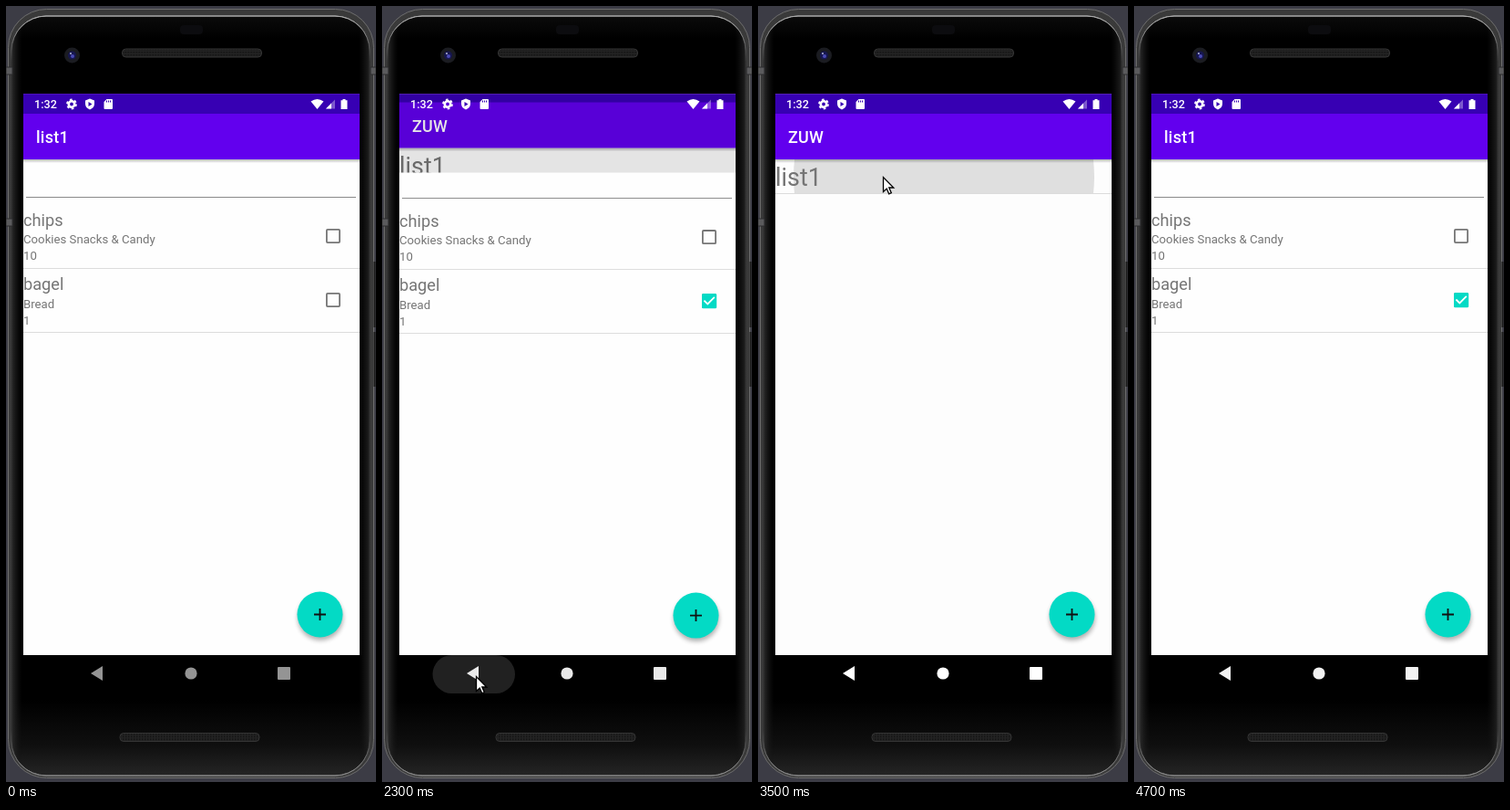
These frames come from a looping animation (406 px wide and 850 px high, 4.8 s). An HTML page:

```html
<!DOCTYPE html>
<html lang="en">
<head>
<meta charset="utf-8">
<title>Shopping list</title>
<style>
html, body { margin: 0; width: 100%; height: 100%; overflow: hidden; background: #3c3c45; }
svg { display: block; width: 406px; height: 850px; }
text { font-family: Roboto, "Open Sans", sans-serif; fill: #757575; white-space: pre; }
.title { font-size: 18px; font-weight: 500; fill: #fff; letter-spacing: .0125em; }
.name { font-size: 18.2px; }
.info { font-size: 13.2px; }
.big { font-size: 26.9px; }
.clock { font-size: 12.6px; font-weight: 500; fill: #fff; }
</style>
</head>
<body>
<svg viewBox="0 0 406 850">
  <defs>
    <linearGradient id="face" x2="0" y2="1">
      <stop offset="0" stop-color="#0b0b0b"/><stop offset=".03"/>
      <stop offset=".9"/><stop offset=".96" stop-color="#0f0f0f"/><stop offset="1" stop-color="#252525"/>
    </linearGradient>
    <linearGradient id="sides">
      <stop offset="0" stop-color="#2c2c2c"/><stop offset=".03" stop-color="#111" stop-opacity="0"/>
      <stop offset=".97" stop-color="#111" stop-opacity="0"/><stop offset="1" stop-color="#222"/>
    </linearGradient>
    <linearGradient id="edge" x2="0" y2="1">
      <stop offset="0" stop-color="#aaa"/><stop offset=".06" stop-color="#333"/>
      <stop offset=".94" stop-color="#333"/><stop offset="1" stop-color="#888"/>
    </linearGradient>
    <linearGradient id="shade" x2="0" y2="1">
      <stop offset="0" stop-opacity=".28"/><stop offset="1" stop-opacity="0"/>
    </linearGradient>
    <pattern id="mesh" width="3" height="3" patternUnits="userSpaceOnUse">
      <rect width="3" height="3" fill="#232323"/><rect width="1.5" height="1.5" fill="#101010"/>
    </pattern>
    <filter id="soft" x="-30%" y="-30%" width="160%" height="160%"><feGaussianBlur stdDeviation="2.5"/></filter>
    <clipPath id="screen"><rect x="19" y="96.5" width="369" height="614.5"/></clipPath>
    <clipPath id="reveal"><rect id="revealBox" x="19" width="369" height="640"/></clipPath>
    <clipPath id="row"><rect x="19" y="168" width="369" height="37"/></clipPath>
    <g id="bar">
      <rect x="19" y="168" width="369" height="4" fill="url(#shade)"/>
      <rect x="19" y="96" width="369" height="72" fill="#6200ee"/>
      <rect x="19" y="96" width="369" height="22" fill="#3700b3"/>
    </g>
    <g id="fab">
      <circle cx="345" cy="670" r="25" opacity=".3" filter="url(#soft)"/>
      <circle cx="344.5" cy="666.5" r="25" fill="#03dac5"/>
      <path d="M338 666.5h13M344.5 660v13" stroke="#111" stroke-width="1.8"/>
    </g>
    <rect id="box" x="351.9" y="244.9" width="14.2" height="14.2" rx="1" fill="none" stroke="#757575" stroke-width="1.8"/>
    <rect id="grille" width="153" height="9" rx="4" fill="url(#mesh)" stroke="#353535"/>
  </defs>

  <!-- phone -->
  <rect x="2.5" y="3.5" width="401" height="842" rx="42" fill="#3a3a3a" stroke="#6e6e6e"/>
  <g stroke="url(#edge)">
    <rect x="6" y="11" width="393" height="832" rx="38" fill="url(#face)"/>
    <rect x="6" y="11" width="393" height="832" rx="38" fill="url(#sides)"/>
  </g>
  <path d="M0 67h7v8H0zM0 233h7v8H0zM400 67h6v8h-6z" fill="#5b5b5d" stroke="#2c2c2e"/>
  <path d="M404.5 280v72M404.5 357v60" stroke="#191919" stroke-width="2"/>
  <rect x="191" y="21" width="25" height="10" rx="4" fill="#0c0c0f"/>
  <circle cx="72.5" cy="54" r="8.5" fill="#1b1c21"/>
  <circle cx="72.5" cy="54" r="4.5" fill="#171750"/>
  <circle cx="73" cy="55" r="2" fill="#4a4ab4"/>
  <circle cx="71" cy="52" r="1" fill="#b5b8d6"/>
  <use href="#grille" x="127.5" y="47"/>
  <use href="#grille" x="125" y="796.5"/>

  <!-- app -->
  <g clip-path="url(#screen)">
    <g id="home">
      <rect x="19" y="90" width="369" height="640" fill="#fdfdfd"/>
      <g clip-path="url(#row)"><circle id="ripple" cx="204" cy="187" fill="#dfdfdf"/></g>
      <path d="M19 205.5h369" stroke="#dcdcdc"/>
      <text class="big" x="19" y="197">list1</text>
      <use href="#bar"/>
      <text class="title" x="33" y="150">ZUW</text>
      <use href="#fab"/>
    </g>
    <rect id="dim" x="19" y="96" width="369" height="615"/>
    <g clip-path="url(#reveal)">
      <g id="list">
        <rect x="19" y="97" width="369" height="640" fill="#fefefe"/>
        <path d="M22 209.5h362" stroke="#8a8a8a"/>
        <path d="M19 287.5h369M19 357.5h369" stroke="#dcdcdc"/>
        <text class="name" x="19" y="241">chips</text>
        <text class="info" x="19" y="260">Cookies Snacks &amp; Candy</text>
        <text class="info" x="19" y="278">10</text>
        <text class="name" x="19" y="311">bagel</text>
        <text class="info" x="19" y="330.5">Bread</text>
        <text class="info" x="19" y="348.5">1</text>
        <use href="#box"/>
        <use href="#box" y="70"/>
        <g id="tick">
          <rect x="351" y="314" width="16.2" height="16.2" rx="1.5" fill="#03dac5"/>
          <path d="M353.4 321.5l3.9 3.9 7.5-7.5" fill="none" stroke="#fff" stroke-width="1.8"/>
        </g>
        <use href="#bar"/>
        <text class="title" x="33" y="150">list1</text>
        <use href="#fab"/>
      </g>
    </g>
  </g>

  <!-- status icons -->
  <text class="clock" x="31" y="112">1:32</text>
  <g fill="#fff">
    <circle cx="72" cy="107.5" r="3.2" fill="none" stroke="#fff" stroke-width="2.6"/>
    <circle cx="72" cy="107.5" r="5" fill="none" stroke="#fff" stroke-width="1.8" stroke-dasharray="2.618"/>
    <path d="M92 101.5l5 2v3.5q0 4.5-5 6.500-5-2-5-6.500v-3.500z"/>
    <path d="M90.5 105l4 2.500-4 2.500z" fill="#3700b3"/>
    <path d="M110.5 102h5.500q1 0 1 1v9q0 1-1 1h-7.500q-1 0-1-1v-7z"/>
    <path d="M110.5 103.5v2M112.5 103.5v2M114.5 103.5v2" stroke="#3700b3"/>
    <path d="M334.5 104.5q7-5 14 0l-7 8.500z"/>
    <path d="M351 112.5l10-10v10z" opacity=".35"/>
    <path d="M351 112.5l6-6v6z"/>
    <path d="M369.5 102h3v1.200h2v9.800h-7v-9.800h2z"/>
  </g>

  <!-- navigation -->
  <rect id="press" x="55.5" y="711" width="90.5" height="42" rx="21" fill="#212121"/>
  <g id="nav" fill="#fff">
    <path d="M93 731l13-8v16z"/>
    <circle cx="203" cy="731" r="6.6"/>
    <rect x="298" y="724" width="14" height="14" rx="1"/>
  </g>
  <path id="cursor" d="M.5.5v16l3.700-3.500 2.500 5.800 2.600-1.100-2.500-5.700h5z" fill="#fff" stroke="#000" stroke-width="1.3"/>
</svg>
<script>
const LOOP = 4800, STEP = 100, TOP = 96.5, HEIGHT = 614;
const el = id => document.getElementById(id);
const clamp = v => Math.max(0, Math.min(1, v));
const smooth = v => (v = clamp(v), v * v * (3 - 2 * v));
const set = (id, attrs) => { for (const k in attrs) el(id).setAttribute(k, attrs[k]); };
const show = (id, on) => set(id, { visibility: on ? "visible" : "hidden" });

// time, x, y
const path = [
  [100, 398, 835], [600, 374, 470], [900, 361, 330], [1400, 361, 330],
  [1900, 103, 734], [2400, 103, 734], [2700, 117, 486], [3000, 132, 190],
  [3100, 137, 187], [3700, 137, 187], [4000, 134, 210], [4100, 134, 210], [4300, 388, 680]
];

function pointer(t) {
  const i = Math.max(1, path.findIndex(p => p[0] >= t));
  const [a, b] = [path[i - 1], path[i]];
  const f = (t - a[0]) / (b[0] - a[0]);
  return [1, 2].map(n => Math.round(a[n] + (b[n] - a[n]) * f));
}

function draw(t) {
  // 1 = list screen fully open, 0 = home screen
  const open = t < 3000 ? 1 - smooth((t - 2200) / 425) : smooth((t - 3550) / 400);
  set("revealBox", { y: TOP + HEIGHT * (1 - open) });
  show("list", open > 0);
  set("list", { transform: `translate(0 ${25 * (1 - open) ** 1.6})` });
  set("home", { transform: `translate(0 ${-14.5 * open})` });
  set("dim", { opacity: .105 * Math.sqrt(open) });
  set("ripple", { r: t < 3500 ? 0 : 165 + (t - 3500) * .6 });
  set("tick", { display: t >= 1200 ? "inline" : "none" });
  show("press", t >= 2200 && t < 2500);
  const light = t < 2100 ? .58 : Math.min(1, .58 + (t - 2100) / 600);
  set("nav", { opacity: t >= 4700 ? .95 : light });
  const visible = t >= 100 && t <= 4300;
  show("cursor", visible);
  if (visible) set("cursor", { transform: `translate(${pointer(t)})` });
}

function frame() {
  draw(Math.floor(performance.now() % LOOP / STEP) * STEP);
  requestAnimationFrame(frame);
}
frame();
</script>
</body>
</html>
```
